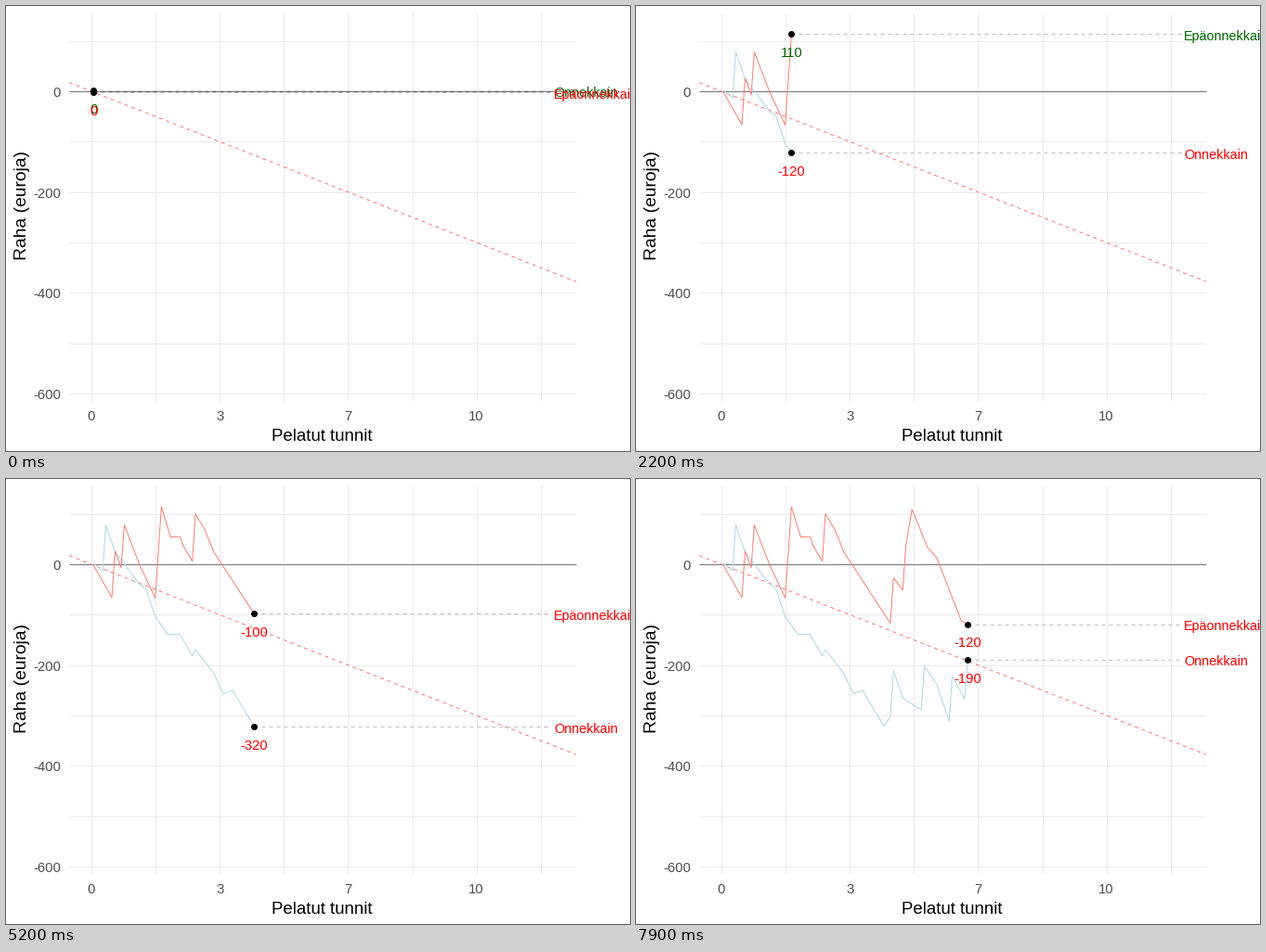
Write a matplotlib script that moves like this. It is 672x480 px and loops after 8000 ms.

```python
import matplotlib.pyplot as plt
import numpy as np
from matplotlib.animation import FuncAnimation

W, H, DPI = 672, 480, 96
PT = 72 / DPI                      # points per pixel
FRAMES, INTERVAL = 80, 100

X0, HOUR = 91.8, 41.486            # x of hour zero, pixels per hour
Y0, EURO = 92.0, 0.5435            # y of zero euros, pixels per euro
LEFT, RIGHT, TOP, BOTTOM = 68, 614, 7.3, 426
START, STEP, END = 94.1, 3.33, 590
LOSS_PER_HOUR = 30

# Turning points (step, euros): slow losses broken by sudden wins
LUCKY = [(0, 2), (3, -13), (4, 78), (7, 25), (15, -40), (17, -49),
         (20, -104), (24, -139), (28, -139), (32, -182), (33, -169),
         (39, -217), (42, -257), (45, -250), (52, -322), (54, -302),
         (55, -211), (58, -265), (64, -289), (65, -202), (69, -238),
         (73, -312), (74, -222), (78, -268), (79, -189)]
UNLUCKY = [(0, -2), (6, -66), (7, 26), (9, -7), (10, 78), (15, -2),
           (20, -67), (22, 114), (25, 54), (28, 55), (29, 37), (32, 6),
           (33, 100), (36, 69), (39, 24), (54, -117), (55, -27),
           (58, -51), (59, 36), (61, 109), (66, 34), (69, 13),
           (77, -113), (79, -119)]

plt.rcParams["font.family"] = "Liberation Sans"
fig = plt.figure(figsize=(W / DPI, H / DPI), dpi=DPI, facecolor="white")
ax = fig.add_axes([0, 0, 1, 1])
ax.set(xlim=(0, W), ylim=(H, 0))
ax.axis("off")


def x_px(hours):
    return X0 + hours * HOUR


def y_px(euros):
    return Y0 - euros * EURO


def line(xs, ys, color, **kw):
    return ax.plot(xs, ys, color=color, lw=PT, solid_capstyle="butt",
                   dash_capstyle="butt", **kw)[0]


def text(x, y, s, px, color="black", **kw):
    return ax.text(x, y, s, fontsize=px * PT, color=color,
                   va="baseline", **kw)


def draw_axes():
    for k in range(8):
        hours = k * 5 / 3
        x = x_px(hours)
        line([x, x], [TOP, BOTTOM], "#EBEBEB", zorder=1)
        if k % 2 == 0:
            text(x, 447, f"{hours:.0f}", 14.93, "#4D4D4D", ha="center")
    for euros in range(100, -601, -100):
        y = y_px(euros)
        line([LEFT, RIGHT], [y, y], "#EBEBEB", zorder=1)
        if euros % 200 == 0:
            text(59, y + 6, str(euros), 14.93, "#4D4D4D", ha="right")
    text(340.7, 469, "Pelatut tunnit", 18.67, ha="center")
    text(22.5, 214.8, "Raha (euroja)", 19.3, ha="center", rotation=90,
         rotation_mode="anchor")

    line([LEFT, RIGHT], [Y0, Y0], "#757575", zorder=2)
    ends = np.array([LEFT, RIGHT])
    line(ends, y_px(-LOSS_PER_HOUR * (ends - X0) / HOUR), "#FF7474",
         dashes=(4, 4), zorder=2)


class Player:
    def __init__(self, name, turns, color, z):
        steps = np.arange(FRAMES)
        self.balance = np.interp(steps, *zip(*turns))
        self.xs = START + STEP * steps
        self.ys = y_px(self.balance)
        self.path = line([], [], color, zorder=4)
        self.guide = line([], [], "#BEBEBE", dashes=(4, 4), zorder=3)
        self.dot = ax.plot([], [], "o", color="black", ms=7 * PT, mew=0,
                           zorder=5)[0]
        self.amount = text(0, 0, "", 14.72, ha="center", zorder=z)
        self.name = text(END, 0, name, 14.4, ha="left", zorder=z)

    def show(self, i):
        x, y, euros = self.xs[i], self.ys[i], self.balance[i]
        self.path.set_data(self.xs[:i + 1], self.ys[:i + 1])
        self.guide.set_data([x, END - 3], [y, y])
        self.dot.set_data([x], [y])
        self.amount.set_position((x, y + 24.8))
        self.amount.set_text(str(int(round(euros, -1))))
        self.name.set_y(y + 6.6)
        for label in (self.amount, self.name):
            label.set_color("darkgreen" if euros >= 0 else "red")


draw_axes()
players = [
    Player("Onnekkain", LUCKY, "lightblue", 6),
    Player("Epäonnekkain", UNLUCKY, "salmon", 7),
]


def update(i):
    for p in players:
        p.show(i)
    return []


anim = FuncAnimation(fig, update, frames=FRAMES, interval=INTERVAL,
                     repeat=True, repeat_delay=0, blit=False)
plt.show()
```
